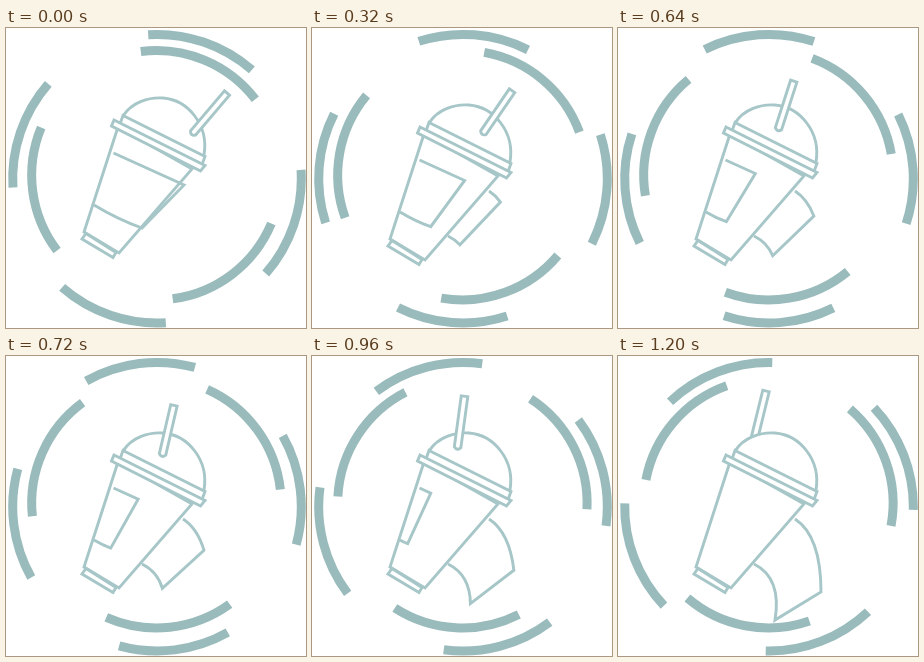
Recreate the animation shown at these times as an HTML page with a canvas. Size 300 by 300 pixels, loop 1.24 s.

```html
<!DOCTYPE html>
<html>
<head>
<meta charset="utf-8">
<title>Iced drink</title>
<style>
  html, body { margin: 0; width: 100%; height: 100%; overflow: hidden; background: #fff; }
  canvas { display: block; width: 300px; height: 300px; }
</style>
</head>
<body>
<canvas id="stage" width="300" height="300"></canvas>
<script>
const ctx = document.getElementById('stage').getContext('2d');
const STEP = 40, STEPS = 31;
const RING = '#9abbbc', LINE = '#a6c6c8';

// Step and share of the whole turn reached by then: quick, slower, quick, slowing.
const pace = [[0, 0], [8, .36], [16, .577], [21, .76], [30, 1]];

const mix = (a, b, t) => a + (b - a) * t;
const mixPoint = (p, q, t) => [mix(p[0], q[0], t), mix(p[1], q[1], t)];

function progress(n) {
  const i = Math.max(1, pace.findIndex(([step]) => step >= n));
  const [n0, p0] = pace[i - 1], [n1, p1] = pace[i];
  return mix(p0, p1, (n - n0) / (n1 - n0));
}

function polygon(...points) {
  ctx.beginPath();
  points.forEach(p => ctx.lineTo(...p));
  ctx.closePath();
  ctx.fill();
  ctx.stroke();
}

function ring(cx, cy, radius, count, start, sweep) {
  const rad = Math.PI / 180;
  ctx.strokeStyle = RING;
  ctx.lineWidth = 9;
  for (let i = 0; i < count; i++) {
    const a = start + i * 360 / count;
    ctx.beginPath();
    ctx.arc(cx, cy, radius, a * rad, (a + sweep) * rad);
    ctx.stroke();
  }
}

// The straw stirs round half an ellipse, its tip swinging wider than its foot.
function drawStraw(p) {
  const swing = Math.cos(Math.PI * p), bulge = Math.sin(Math.PI * p);
  const foot = [187 - 51 * p + 3 * bulge, 105 - 21 * p + 8 * bulge];
  const tip = [184.5 + 36.5 * swing, 50 + 15 * swing + 7 * bulge];
  const dx = tip[0] - foot[0], dy = tip[1] - foot[1];
  const length = Math.hypot(dx, dy), half = 3.3;
  ctx.save();
  ctx.translate(...foot);
  ctx.rotate(Math.atan2(dy, dx));
  ctx.beginPath();
  ctx.moveTo(0, -half);
  ctx.lineTo(length, -half);
  ctx.lineTo(length, half);
  ctx.lineTo(0, half);
  ctx.quadraticCurveTo(-4, 0, 0, -half);
  ctx.closePath();
  ctx.fill();
  ctx.stroke();
  ctx.restore();
}

function drawDome() {
  ctx.beginPath();
  ctx.moveTo(117, 95);
  ctx.bezierCurveTo(126, 81, 143, 76, 157, 77);
  ctx.bezierCurveTo(182, 79, 203, 104, 198, 134);
  ctx.fill();
  ctx.stroke();
}

// The first part t of a quadratic curve: its control point and end point.
function partCurve(a, control, b, t) {
  const mid = mixPoint(a, control, t);
  return [mid, mixPoint(mid, mixPoint(control, b, t), t)];
}

// The loose side of the sleeve unrolls along two fixed curves.
function drawFlap(t) {
  const top = [177, 163], bottom = [136, 208];
  const [topMid, topEnd] = partCurve(top, [203, 180], [203, 236], t);
  const [bottomMid, bottomEnd] = partCurve(bottom, [164, 222], [157, 264], t);
  ctx.beginPath();
  ctx.moveTo(...top);
  ctx.quadraticCurveTo(...topMid, ...topEnd);
  ctx.lineTo(...bottomEnd);
  ctx.quadraticCurveTo(...bottomMid, ...bottom);
  ctx.stroke();
}

function drawLabel(t) {
  const topLeft = [107.5, 132], bottomLeft = [88, 184];
  const bottomRight = mixPoint(bottomLeft, [136, 207], t);
  const middle = mixPoint(bottomLeft, bottomRight, .5);
  ctx.beginPath();
  ctx.moveTo(...topLeft);
  ctx.lineTo(...mixPoint(topLeft, [178, 164], t));
  ctx.lineTo(...bottomRight);
  ctx.quadraticCurveTo(middle[0], middle[1] + 3 * t, ...bottomLeft);
  ctx.stroke();
}

function draw(n) {
  ctx.fillStyle = '#fff';
  ctx.fillRect(0, 0, 300, 300);

  const p = progress(n);
  ring(151, 150.7, 144.3, 4, -3.5 - 39.8 * p, 44.6);
  ring(150.4, 147.2, 124.7, 3, 22.8 + 48 * p, 59.7);

  ctx.strokeStyle = LINE;
  ctx.lineWidth = 2.9;
  const behind = p > .95;
  if (behind) drawStraw(p);

  ctx.save();
  ctx.translate(0, -7 * Math.max(0, 1 - n / 4));
  drawDome();
  if (p > 0) drawFlap(p ** 1.35);
  polygon([112, 106], [186, 148], [113, 232], [78, 211]);
  if (p < 1) drawLabel(1 - p);
  polygon([80, 212.5], [110, 231.5], [107, 236.5], [76, 218]);
  polygon([117, 94.5], [199, 135.5], [196, 143.5], [114, 103]);
  polygon([108, 99], [199, 144.5], [194.5, 150], [105.5, 105]);
  ctx.restore();

  if (!behind) drawStraw(p);
}

function tick() {
  draw(Math.floor(performance.now() / STEP) % STEPS);
  requestAnimationFrame(tick);
}
tick();
</script>
</body>
</html>
```
